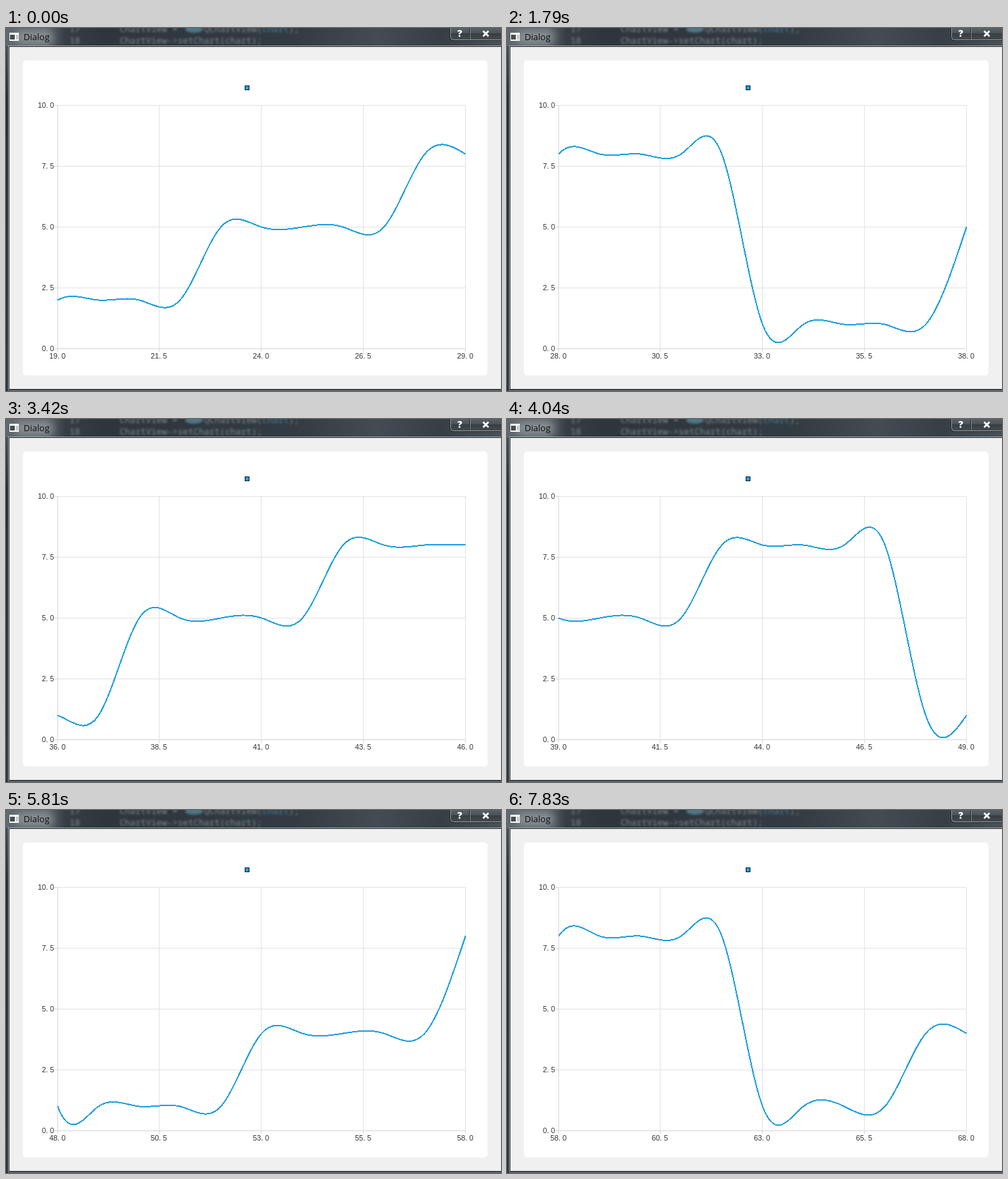
Animation, 732 px wide and 537 px high, one loop 8.06 s. Source, as an HTML page:

```html
<!DOCTYPE html>
<html lang="en">
<head>
<meta charset="utf-8">
<title>Dialog</title>
<style>
  html, body { margin: 0; width: 100%; height: 100%; overflow: hidden; background: #f0f0f0; }
  svg { display: block; width: 732px; height: 537px; }
  .crisp { shape-rendering: crispEdges; }
  .labels { font: 11px "Liberation Sans", sans-serif; fill: #35322f; }
  .code { font: 13px "Noto Sans Mono", monospace; fill: #7f898e; }
  .title { font: 13px "Open Sans", sans-serif; fill: #0c0f11; }
</style>
</head>
<body>
<svg viewBox="0 0 732 537">
  <defs>
    <linearGradient id="bar">
      <stop offset="0" stop-color="#5f686d"/>
      <stop offset=".08" stop-color="#5f686d"/>
      <stop offset=".12" stop-color="#353e44"/>
      <stop offset=".2" stop-color="#2d363c"/>
      <stop offset=".58" stop-color="#323b42"/>
      <stop offset=".75" stop-color="#434c53"/>
      <stop offset=".88" stop-color="#363f45"/>
      <stop offset="1" stop-color="#4a5257"/>
    </linearGradient>
    <linearGradient id="side" x2="0" y2="1">
      <stop offset="0" stop-color="#4d565b"/>
      <stop offset=".2" stop-color="#20282d"/>
      <stop offset="1" stop-color="#2c353b"/>
    </linearGradient>
    <linearGradient id="button" x2="0" y2="1">
      <stop offset="0" stop-color="#5d6468"/>
      <stop offset=".45" stop-color="#4d5459"/>
      <stop offset=".5" stop-color="#363e43"/>
      <stop offset="1" stop-color="#444c51"/>
    </linearGradient>
    <filter id="soft" x="-20%" y="-50%" width="140%" height="200%"><feGaussianBlur stdDeviation="1.8"/></filter>
    <filter id="glow" x="-50%" y="-80%" width="200%" height="260%"><feGaussianBlur stdDeviation="6"/></filter>
    <clipPath id="plot"><rect x="76" y="114" width="604" height="361"/></clipPath>
    <clipPath id="top"><rect width="732" height="27"/></clipPath>
  </defs>

  <!-- window frame -->
  <rect width="732" height="537" fill="url(#side)"/>
  <g clip-path="url(#top)">
    <rect width="732" height="27" fill="url(#bar)"/>
    <g class="code" filter="url(#soft)">
      <text x="94" y="6">17</text>
      <text x="94" y="23">18</text>
      <text x="168" y="6">ChartView =</text>
      <ellipse cx="278" cy="2" rx="13" ry="5" fill="#4f7486"/>
      <text x="293" y="6">QChartView(</text>
      <text x="379" y="6" fill="#4d7e9c">chart</text>
      <text x="418" y="6">);</text>
      <text x="168" y="23">ChartView-&gt;setChart(chart);</text>
    </g>
    <rect x="14" y="4" width="56" height="19" rx="9" fill="#a5abae" opacity=".6" filter="url(#glow)"/>
  </g>
  <g class="crisp">
    <path d="M3.5 537V26.5H732" fill="none" stroke="#a9b0b4"/>
    <path d="M4.5 535V27.5H732" fill="none" stroke="#1c2226"/>
    <rect x="5" y="28" width="727" height="506" fill="#f0f0f0"/>
    <rect x="4" y="534" width="728" height="1" fill="#1c2226"/>
    <rect x="3" y="535" width="729" height="2" fill="#596268"/>
    <rect x="5" y="7" width="14" height="12" fill="#f7f7f7"/>
    <rect x="6" y="10" width="7" height="7" fill="#454d50"/>
    <path d="M15.5 10V17M17.5 10V17" stroke="#a2a8aa"/>
  </g>
  <text class="title" x="26" y="18">Dialog</text>
  <path d="M657.5 -1V13.5Q657.5 17.5 661.5 17.5H733V-1Z" fill="url(#button)" stroke="#969ca0"/>
  <path d="M656.5 0V14Q656.5 18.5 661 18.5H732" fill="none" stroke="#22292d"/>
  <path d="M685.5 0V17" stroke="#22292d"/>
  <path d="M686.5 0V17" stroke="#858b8f"/>
  <text x="667.5" y="13" font-family="Open Sans, sans-serif" font-size="14" font-weight="800" fill="#fff">?</text>
  <path d="M705.5 4.5L713.5 12.2M713.5 4.5L705.5 12.2" stroke="#fff" stroke-width="2.6"/>

  <!-- chart -->
  <rect x="25" y="48" width="687" height="466" rx="5" fill="#fff"/>
  <rect class="crisp" x="353.5" y="85.5" width="6" height="6" fill="#209fdf" stroke="#0a1a24"/>
  <g id="grid" class="crisp" fill="none"></g>
  <g id="labels" class="labels"></g>
  <g clip-path="url(#plot)">
    <path id="curve" class="crisp" fill="none" stroke="#209fdf" stroke-width="2"/>
  </g>
</svg>
<script>
const LOOP = 8060, FIRST = 19, SPAN = 10, HISTORY = 13;
const LEFT = 76, BOTTOM = 474, UNIT_X = 60.3, UNIT_Y = 36, CELL = 6;
// moments at which the window moves on by one unit
const STEPS = [150, 380, 540, 770, 1000, 1160, 1410, 1560, 1790, 2010, 2170, 2410, 2570,
  2790, 3020, 3180, 3410, 3570, 3800, 4040, 4190, 4420, 4580, 4800, 5040, 5190, 5420,
  5580, 5810, 6040, 6190, 6430, 6580, 6820, 7050, 7200, 7430, 7590, 7830];
const LEVELS = [8, 2, 5, 8, 1, 5, 8, 1, 4, 8, 1];

const byId = id => document.getElementById(id);
const value = n => n > 66 ? 4 : LEVELS[Math.floor((n - HISTORY) / 5)];

function add(parent, name, attrs) {
  const el = document.createElementNS("http://www.w3.org/2000/svg", name);
  for (const key in attrs) el.setAttribute(key, attrs[key]);
  return parent.appendChild(el);
}

function line(d, stroke) {
  add(byId("grid"), "path", { d, stroke });
}

// one character per cell, as in a fixed-pitch face
function label(x, y, text) {
  const cells = [...text].map((_, i) => x + i * CELL).join(" ");
  const el = add(byId("labels"), "text", { x: cells, y });
  el.textContent = text;
  return el;
}

const xLabels = [];
for (let i = 0; i < 5; i++) {
  const x = Math.floor(LEFT + i * UNIT_X * 2.5), y = BOTTOM - i * 90;
  line(`M${x + .5} 114V474`, i ? "#e2e2e2" : "#d6d6d6");
  line(`M76 ${y + .5}H680`, i ? "#e2e2e2" : "#d6d6d6");
  line(`M${x + .5} 475V479M72 ${y + .5}H76`, "#d6d6d6");
  const text = (i * 2.5).toFixed(1);
  label(71 - CELL * text.length, y + 4, text);
  xLabels.push(label(x - 2 * CELL, 489, "00.0"));
}

// knot slopes of the natural cubic spline over all points up to the last one
function slopes(last) {
  const n = last - HISTORY;
  const v = Array.from({ length: n + 1 }, (_, i) => value(HISTORY + i));
  const m = v.map(() => 0);
  for (let pass = 0; pass < 30; pass++) {
    m[0] = (3 * (v[1] - v[0]) - m[1]) / 2;
    for (let i = 1; i < n; i++) m[i] = (3 * (v[i + 1] - v[i - 1]) - m[i - 1] - m[i + 1]) / 4;
    m[n] = (3 * (v[n] - v[n - 1]) - m[n - 1]) / 2;
  }
  return m;
}

function draw(start) {
  const m = slopes(start + SPAN);
  const point = (x, y) =>
    `${(LEFT + .5 + (x - start) * UNIT_X).toFixed(2)} ${(BOTTOM + .5 - y * UNIT_Y).toFixed(2)}`;
  let d = "M" + point(start, value(start));
  for (let n = start; n < start + SPAN; n++) {
    const a = value(n), b = value(n + 1), i = n - HISTORY;
    d += `C${point(n + 1 / 3, a + m[i] / 3)} ${point(n + 2 / 3, b - m[i + 1] / 3)} ${point(n + 1, b)}`;
  }
  byId("curve").setAttribute("d", d);
  xLabels.forEach((el, i) => { el.textContent = (start + i * 2.5).toFixed(1); });
}

let shown;
function tick() {
  const t = performance.now() % LOOP;
  const start = FIRST + STEPS.filter(s => s <= t).length;
  if (start !== shown) draw(shown = start);
  requestAnimationFrame(tick);
}
tick();
</script>
</body>
</html>
```
